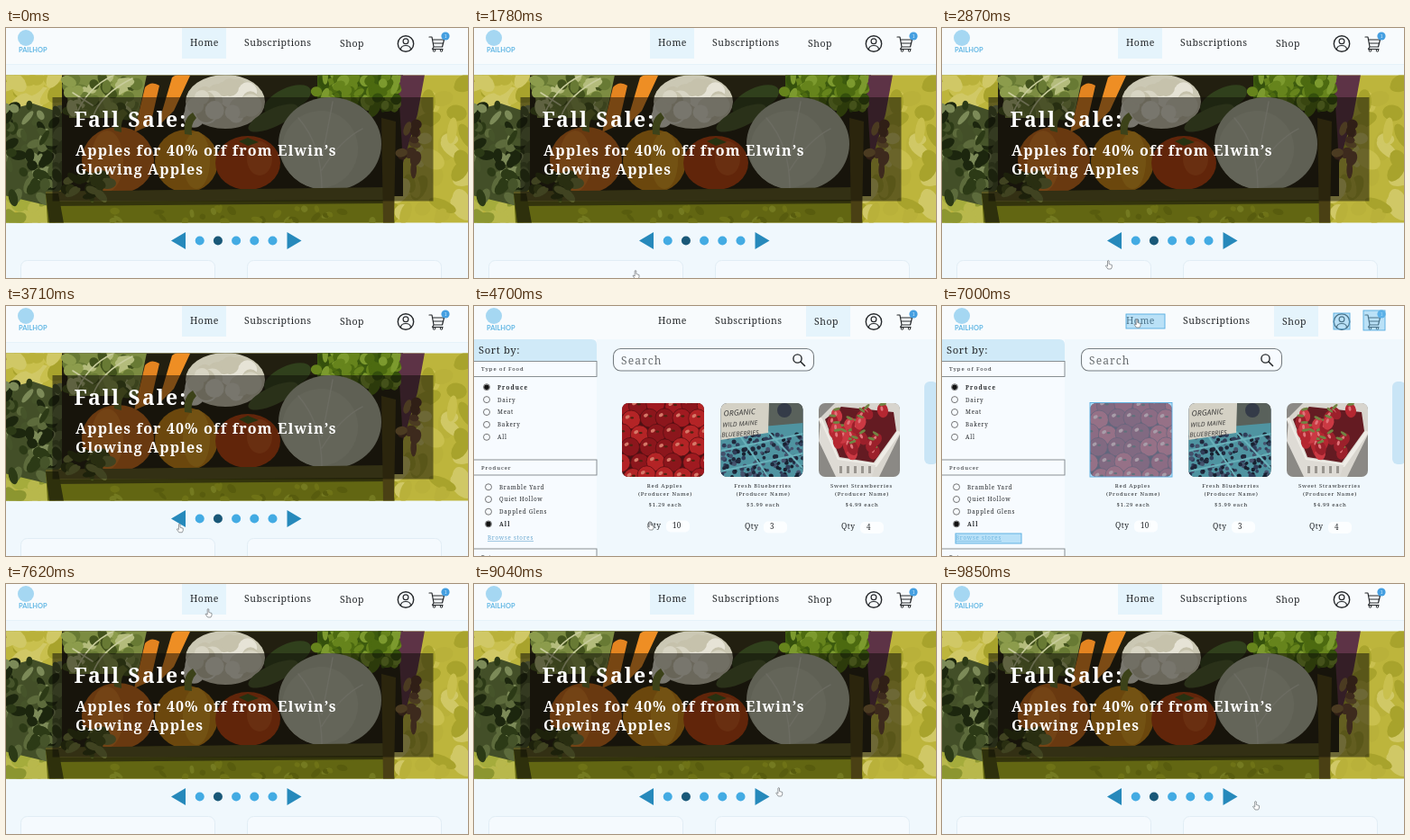
These frames come from a looping animation (512 px wide and 278 px high, 9.95 s). An HTML page:

```html
<!DOCTYPE html>
<html lang="en">
<head>
<meta charset="utf-8">
<title>Grocery storefront</title>
<style>
  html, body { margin: 0; width: 100%; height: 100%; overflow: hidden; background: #f0f8fd; }
  svg { display: block; width: 100%; height: 100%; }
  text { font-family: "Noto Serif", "Liberation Serif", serif; fill: #25282b; }
</style>
</head>
<body>
<svg id="stage" viewBox="0 0 512 278"></svg>
<script>
const LOOP = 9950;
const INK = '#25282b';

let seed = 7;
const rand = (lo = 0, hi = 1) => {
  seed = (seed * 16807) % 2147483647;
  return lo + (hi - lo) * seed / 2147483647;
};
const pick = list => list[Math.floor(rand(0, list.length))];
const repeat = (n, fn) => Array.from({ length: n }, (_, i) => fn(i)).join('');

const text = (x, y, size, ls, str, attrs = '') =>
  `<text x="${x}" y="${y}" font-size="${size}" letter-spacing="${ls}" ${attrs}>${str}</text>`;
const rect = (x, y, w, h, fill, attrs = '') =>
  `<rect x="${x}" y="${y}" width="${w}" height="${h}" fill="${fill}" ${attrs}/>`;
const circle = (x, y, r, fill, attrs = '') =>
  `<circle cx="${x}" cy="${y}" r="${r}" fill="${fill}" ${attrs}/>`;
const oval = (x, y, rx, ry, fill, turn = 0) =>
  `<ellipse cx="${x}" cy="${y}" rx="${rx}" ry="${ry}" fill="${fill}" transform="rotate(${turn} ${x} ${y})"/>`;
const path = (d, fill, attrs = '') => `<path d="${d}" fill="${fill}" ${attrs}/>`;
const line = (d, width, color = INK) => path(d, 'none', `stroke="${color}" stroke-width="${width}" stroke-linecap="round" stroke-linejoin="round"`);
const scatter = (n, x0, y0, x1, y1, r, colors) => repeat(n, () =>
  oval(rand(x0, x1), rand(y0, y1), r * rand(.6, 1.3), r * rand(.4, .8), pick(colors), rand(0, 180)));

function header(active, subX, shopX, height) {
  const tabX = active === 'Home' ? 195 : 368;
  return rect(0, 0, 512, height, '#f8fbfd') +
    rect(tabX, 0, 49, 34, '#e5f4fc') +
    circle(22, 11, 9, '#a5d7f2') +
    text(14, 27, 7.4, 0, 'PAILHOP', 'style="font-family:Lato,sans-serif;font-weight:700;fill:#62b7e4"') +
    text(204, 20, 10.5, .5, 'Home') +
    text(subX, 20, 10.5, .5, 'Subscriptions') +
    text(shopX, 20.5, 10.5, .5, 'Shop') +
    circle(443, 17.5, 8.7, 'none', `stroke="${INK}" stroke-width="1.4"`) +
    circle(443, 14.7, 2.9, 'none', `stroke="${INK}" stroke-width="1.2"`) +
    line('M437.5 23.5Q438 19.5 443 19.5Q448 19.5 448.5 23.5', 1.2) +
    line('M469 10H472L474 21H483.5L485.5 13H472.5M473.500 17H484.5M474 21L472.5 23.5H484', 1.2) +
    circle(474.5, 25, 1.3, 'none', `stroke="${INK}"`) +
    circle(482.5, 25, 1.3, 'none', `stroke="${INK}"`) +
    circle(487, 9, 4.6, '#459fe0') +
    text(485.8, 11, 5, 0, '1', 'style="fill:#d8efff"');
}

function harvest() {
  const leaf = ['#2c3a16', '#46542a', '#5d6b3c', '#1c260e', '#7c8a58'];
  const lawn = ['#b9b13a', '#c9c04e', '#a8a32c', '#d0c866'];
  const frill = ['#8c9c4c', '#b4bc7c', '#687a34', '#42521c'];
  const herb = ['#4c6a10', '#66841c', '#7c9a2e', '#34500c'];
  return `<g clip-path="url(#banner)">` +
    rect(0, 52, 512, 165, '#bdb53c') +
    scatter(40, 430, 55, 515, 218, 13, lawn) +
    scatter(20, -5, 52, 60, 88, 13, lawn) +
    scatter(16, -5, 185, 50, 218, 12, ['#a5ac3c', '#8c9630', '#b8b84c']) +
    path('M-2 92L30 84L66 96V176L40 196L-2 186Z', '#434f28') +
    scatter(75, -4, 86, 60, 192, 8, leaf) +
    rect(62, 52, 378, 135, '#221f10') +
    path('M434 52H464L456 96L440 150Z', '#5d3346') +
    scatter(12, 432, 105, 456, 160, 8, ['#6e4a34', '#8c6c3c', '#543426']) +
    // lettuce and carrots
    path('M66 52H156L146 100H70Z', '#7c8c42') +
    scatter(45, 68, 54, 146, 96, 9, frill) +
    line('M78 96Q90 66 120 52M96 100Q104 74 140 56M74 72L96 86', 1.5, '#c8cc9c') +
    path('M154 66Q161 58 170 64L160 108L142 116Z', '#e48420') +
    path('M184 55Q194 48 204 53L186 92L168 110Z', '#ee8e24') +
    // cauliflower
    oval(243, 82, 44, 30, '#cbc8b4') +
    repeat(24, () => circle(rand(208, 276), rand(66, 100), rand(8, 13), pick(['#d8d5c4', '#c6c2ac', '#e6e3d6']))) +
    oval(312, 80, 28, 13, '#30401c', -25) +
    oval(296, 100, 30, 10, '#48582c', -25) +
    rect(345, 52, 88, 36, '#3c5a0e') +
    scatter(80, 344, 52, 434, 90, 8, herb) +
    // peppers, tomato and cabbage
    oval(124, 147, 40, 37, '#c8681a') + oval(112, 148, 18, 34, '#dc7c24') +
    path('M120 114Q116 95 130 90L135 95Q126 102 128 116Z', '#66722c') +
    oval(200, 148, 35, 35, '#cc8614') + oval(211, 147, 15, 32, '#dc9c20') +
    path('M198 118Q196 100 207 94L211 100Q204 107 206 119Z', '#6c7a2c') +
    oval(268, 150, 36, 30, '#b8400e') + oval(281, 145, 14, 19, '#c8541c') +
    path('M258 126L268 122L280 127L268 131Z', '#42581c') +
    oval(359, 129, 57, 52, '#b4b8a4') + oval(348, 135, 42, 43, '#bec2ae', 20) +
    line('M350 178Q350 130 324 100M350 158Q370 125 395 112M350 145Q358 105 362 82', 1.3, '#ced0c0') +
    // crate
    path('M44 182L424 178L431 217H46Z', '#626612') +
    path('M44 182L424 177V194L46 198Z', '#5a5722') +
    path('M46 193L424 191V195L46 198Z', '#33340c') +
    scatter(30, 70, 200, 410, 216, 5, ['#6e7216', '#585c0e', '#747a20']) +
    path('M44 184H58L64 217H48Z', '#2e300c') +
    path('M416 100L432 104L430 217H418Z', '#4a4014') +
    scatter(22, 64, 164, 114, 188, 8, ['#46521c', '#747c3c', '#2e3810']) +
    `</g>`;
}

function home() {
  const white = 'font-weight="700" style="fill:#fff"';
  return rect(0, 0, 512, 278, '#f0f8fd') + header('Home', 264, 370, 40) +
    rect(0, 40, 512, 1, '#e6f2fa') +
    harvest() +
    rect(51.500, 77, 422, 115.5, '#0c0a06', 'opacity=".5"') +
    text(75.5, 110, 23, 2.1, 'Fall Sale:', white) +
    text(77, 142, 16, 1.15, 'Apples for 40% off from Elwin’s', white) +
    text(77, 163, 16, 1.15, 'Glowing Apples', white) +
    path('M183 236.5L199 227V246Z', '#2689bb') +
    path('M327.5 236.5L311.5 227V246Z', '#2689bb') +
    repeat(5, i => circle(214.7 + 20.2 * i, 236.5, 5, i === 1 ? '#195878' : '#43abe3')) +
    [16.5, 267.5].map(x => rect(x, 258.5, 215, 40, '#f5fafe', 'rx="7" stroke="#e1edf5"')).join('');
}

function option(x, y, label, on) {
  return circle(x, y, 3.5, 'none', 'stroke="#555" stroke-width=".8"') +
    (on ? circle(x, y, 2.8, '#111') : '') +
    text(x + 12, y + 2.4, 6.3, on ? 1.1 : .75, label, on ? 'font-weight="700"' : '');
}

function section(y, label) {
  return rect(-1, y + .5, 137, 17, '#f7fbff', 'stroke="#7d8487" stroke-width=".9"') +
    text(8, y + 11, 6, .9, label);
}

function sidebar() {
  const foods = ['Produce', 'Dairy', 'Meat', 'Bakery', 'All'];
  const farms = ['Bramble Yard', 'Quiet Hollow', 'Dappled Glens', 'All'];
  return rect(0, 37, 136, 241, '#f7fbff') +
    path('M0 37H130Q136 37 136 43V61H0Z', '#d0eaf8') +
    text(5, 53, 11.3, .6, 'Sort by:') +
    section(61, 'Type of Food') +
    foods.map((f, i) => option(14, 90.2 + 13.9 * i, f, i === 0)).join('') +
    section(170.5, 'Producer') +
    farms.map((f, i) => option(16, 201.3 + 13.7 * i, f, i === 3)).join('') +
    text(15, 260, 6.3, .7, 'Browse stores', 'style="fill:#69a7cf;text-decoration:underline"') +
    section(269.5, 'Price');
}

function apples() {
  return rect(164, 108, 91, 82, '#4a1215') + repeat(36, i => {
    const row = Math.floor(i / 6);
    const x = 164 + (i % 6) * 19 - (row % 2) * 9 + rand(-2, 2);
    const y = 110 + row * 16 + rand(-2, 2);
    return circle(x, y, 10.3, pick(['#a01a20', '#b42426', '#8c161c']), 'stroke="#5c1014" stroke-width=".8"') +
      oval(x - 4, y - 3, 2.6, 1.8, '#d67868', -30) + oval(x + 1, y - 2, 2, 1.2, '#4e2412');
  });
}

function blueberries() {
  const sign = (x, y, s, str) => text(x, y, s, .1, str,
    'transform="rotate(-4 300 125)" style="font-family:\'Open Sans\',sans-serif;font-style:italic;fill:#333"');
  return rect(273, 108, 92, 82, '#3d4857') +
    rect(326, 108, 40, 36, '#59615b') + circle(344, 116, 8, '#343b48') +
    path('M273 138L365 130V190H273Z', '#4f94a1') +
    repeat(170, () => circle(rand(273, 365), rand(143, 190), rand(1.6, 2.7),
      pick(['#20293d', '#303d59', '#44526d', '#182030']))) +
    line('M273 161L365 142M273 184L365 164M296 146L326 190M326 140L365 181', 2, '#68b1ba') +
    path('M273 108H327L326 141L273 149Z', '#d4d1c5') +
    sign(277, 121, 8.5, 'ORGANIC') + sign(275, 133, 7, 'WILD MAINE') + sign(273, 144, 7, 'BLUEBERRIES');
}

function strawberries() {
  return rect(382, 108, 90, 82, '#8b8985') +
    path('M382 126L400 108H472V143L449 190H402Z', '#d8d5ce') +
    path('M389 126L407 112L465 118L468 139L443 174L405 168Z', '#641b22') +
    repeat(25, () => {
      const y = rand(116, 166), x = rand(393 + (y - 116) * .2, 464 - (y - 116) * .42), a = rand(-45, 45);
      return oval(x, y, 6, 8, pick(['#b52731', '#cb3943', '#9c202b']), a) +
        oval(x - 1, y - 2, 1.5, 2.7, '#e1747a', a) + oval(x, y - 7, 4, 1.5, '#718443', a);
    }) +
    line('M384 126L403 171L445 177L470 141', 4, '#eeece6') +
    path('M384 128L403 171L445 177L441 190H401L382 150Z', '#dedbd5') +
    repeat(5, i => rect(405 + i * 8, 178, 3, 8, '#99958f'));
}

function product(i, name, price, qty, draw) {
  const x = [211.5, 320, 429.5][i];
  const mid = 'text-anchor="middle"';
  const qx = [192, 300, 407][i], nx = [220, 328, 435][i], drop = [0, 1, 1.5][i];
  return `<g clip-path="url(#photo${i})">${draw()}</g>` +
    text(x, 202, 6, .75, name, mid) +
    text(x + .5, 210.5, 6, .75, '(Producer Name)', mid) +
    text(x + .5, 223.3, 6, .7, price + ' each', mid) +
    text(qx, 247.3 + drop / 2, 8.5, .5, 'Qty') +
    rect(nx - 7, 238.5 + drop, 26, 13, '#fcfeff', 'rx="5"') +
    text(nx, 247 + drop, 8, .4, qty);
}

function shop() {
  return rect(0, 0, 512, 278, '#f0f8fd') + header('Shop', 267, 377, 37) + sidebar() +
    rect(154.5, 47.5, 222, 24.5, '#f7fbff', 'rx="8" stroke="#777e82" stroke-width="1.1"') +
    text(163, 64.5, 12, 1.1, 'Search', 'style="fill:#696d70"') +
    circle(358.5, 58.5, 4.6, 'none', `stroke="${INK}" stroke-width="1.4"`) +
    line('M362 62L366.5 66.5', 1.6) +
    product(0, 'Red Apples', '$1.29', '10', apples) +
    product(1, 'Fresh Blueberries', '$5.99', '3', blueberries) +
    product(2, 'Sweet Strawberries', '$4.99', '4', strawberries) +
    rect(499, 84, 15, 92, '#c9e5f6', 'rx="6"');
}

const hotspots = () => [[204, 9, 43, 16], [434, 8, 18, 18], [467, 5, 24, 22], [164, 107.5, 91, 82.5], [15, 253, 73, 11]]
  .map(([x, y, w, h]) => rect(x, y, w, h, '#75c5f1', 'fill-opacity=".48" stroke="#55acdf" stroke-width=".9"')).join('');

const clip = (id, x, y, w, h, r) =>
  `<clipPath id="${id}">${rect(x, y, w, h, '#000', `rx="${r}"`)}</clipPath>`;

document.getElementById('stage').innerHTML =
  '<defs>' + clip('banner', 0, 52.5, 512, 164, 0) +
  [164, 273.5, 382].map((x, i) => clip('photo' + i, x, 108, [91, 91, 90][i], 82, 7)).join('') +
  `</defs><g id="home">${home()}</g><g id="shop">${shop()}</g><g id="spots">${hotspots()}</g><g id="hand">` +
  path('M-.8 0Q0 -1 .8 0V3.5L4 4.5V7L3 9H-.5L-3 5.5L-2 5L-.8 6Z', '#fff', 'stroke="#6a7075" stroke-width=".7"') +
  `</g>`;

// Pointer path: time, x, y
const route = [
  [700, 250, 52], [880, 85, 185], [1060, 178, 268], [1480, 178, 269], [1780, 179, 270],
  [2380, 179, 270], [3500, 192, 243], [4700, 195, 240], [5700, 195, 240], [5960, 412, 32],
  [6300, 412, 32], [6900, 216, 15], [7300, 216, 15], [7620, 224, 28], [9270, 344, 238], [9850, 347.5, 242], [LOOP, 347.5, 242]
];

function pointerAt(t) {
  const i = route.findIndex(p => p[0] > t);
  const [t0, x0, y0] = route[i - 1], [t1, x1, y1] = route[i];
  const k = (t - t0) / (t1 - t0), e = k * k * (3 - 2 * k);
  return [x0 + (x1 - x0) * e, y0 + (y1 - y0) * e];
}

const el = id => document.getElementById(id);
const show = (id, on) => el(id).setAttribute('visibility', on ? 'visible' : 'hidden');
const within = (t, a, b) => t >= a && t < b;

function frame() {
  const t = performance.now() % LOOP;
  const shopping = within(t, 200, 1480) || within(t, 4200, 7140);
  show('home', !shopping);
  show('shop', shopping);
  show('spots', within(t, 6800, 7140));
  el('spots').setAttribute('opacity', Math.min(1, Math.max(0, (t - 6800) / 150)));
  show('hand', t >= 700);
  if (t >= 700) el('hand').setAttribute('transform', `translate(${pointerAt(t)})`);
  requestAnimationFrame(frame);
}
frame();
</script>
</body>
</html>
```
